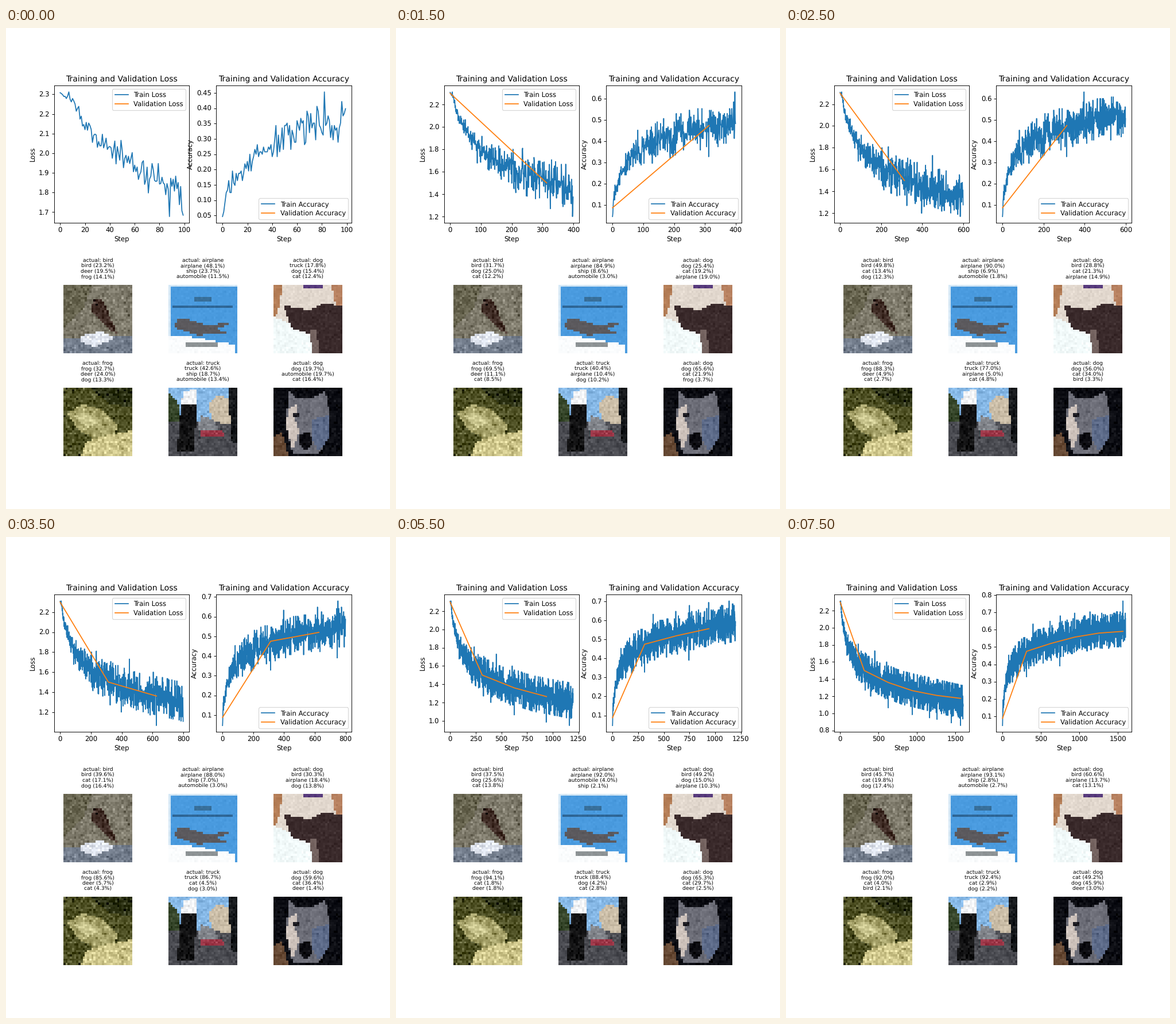
Animation of 669 by 837 pixels, one loop 8000 ms. Source, as a matplotlib script:

```python
import numpy as np
import matplotlib.pyplot as plt
from matplotlib.animation import FuncAnimation
from matplotlib.colors import to_rgb
from matplotlib.path import Path

W, H, DPI = 669, 837, 83.625
FRAMES, INTERVAL, STEPS = 16, 500, 100
BATCH, EPOCH = 128, 313

plt.rcParams["text.hinting"] = "none"

# ---------- training history: mean curve, noise width, outliers ----------
LOSS_MEAN = [(0, 2.305), (8, 2.285), (30, 2.08), (60, 1.93), (100, 1.80), (200, 1.62),
             (400, 1.45), (800, 1.30), (1600, 1.13)]
LOSS_NOISE = [(0, .003), (10, .025), (100, .06), (200, .098)]
LOSS_PEAKS = [(0, 2.308), (88, 1.677), (235, 1.81), (325, 1.27), (397, 1.2),
              (450, 1.73), (585, 1.17), (605, 1.6), (625, 1.065), (937, .985),
              (1163, .948), (1260, .93), (1445, .89), (1565, .858)]
ACC_MEAN = [(0, .047), (4, .14), (20, .21), (60, .34), (100, .37), (200, .43),
            (400, .49), (800, .55), (1200, .59), (1600, .603)]
ACC_NOISE = [(0, .008), (10, .03), (100, .045), (200, .05)]
ACC_PEAKS = [(0, .047), (82, .453), (312, .328), (397, .633), (617, .648),
             (745, .39), (750, .68), (937, .695), (1137, .703), (1565, .766)]
VAL_LOSS = np.array([2.3, 1.5, 1.36, 1.265, 1.21, 1.175])
VAL_ACC = np.array([.088, .475, .52, .557, .58, .59])


def curve(step, points):
    return np.interp(step, *zip(*points))


def noisy(step, mean, width, peaks, z):
    data = curve(step, mean) + curve(step, width) * np.clip(z, -2, 2)
    for at, value in peaks:
        data[at] = value
    return data


rng = np.random.default_rng(7)
step = np.arange(FRAMES * STEPS)
val_step = np.arange(len(VAL_LOSS)) * EPOCH
z, z2 = rng.normal(size=(2, step.size))
loss = noisy(step, LOSS_MEAN, LOSS_NOISE, LOSS_PEAKS, z)
acc = noisy(step, ACC_MEAN, ACC_NOISE, ACC_PEAKS, .75 * z2 - .65 * z)
acc = np.round(acc * BATCH) / BATCH

# ---------- predictions, known at a few frames and blended between ----------
KEYS = [0, 3, 5, 7, 9, 11, 15]
CAPTIONS = {
    "bird": """bird 23.2 deer 19.5 frog 14.1 | bird 31.7 dog 25.0 cat 12.2
        | bird 49.8 cat 13.4 dog 12.3 | bird 39.6 cat 17.1 dog 16.4
        | bird 33.5 cat 22.7 dog 16.4 | bird 37.5 dog 25.6 cat 13.8
        | bird 45.7 cat 19.8 dog 17.4""",
    "airplane": """airplane 48.1 ship 23.7 automobile 11.5
        | airplane 84.9 ship 8.6 automobile 3.0 | airplane 90.0 ship 6.9 automobile 1.8
        | airplane 88.0 ship 7.0 automobile 3.0 | airplane 89.8 ship 5.6 automobile 3.2
        | airplane 92.0 automobile 4.0 ship 2.1 | airplane 93.1 ship 2.8 automobile 2.7""",
    "dog": """truck 17.8 dog 15.4 cat 12.4 | dog 25.4 cat 19.2 airplane 19.0
        | bird 28.8 cat 21.3 airplane 14.9 | bird 30.3 airplane 18.4 dog 13.8
        | bird 41.2 cat 16.4 airplane 15.4 | bird 49.2 dog 15.0 airplane 10.3
        | bird 60.6 airplane 13.7 cat 13.1""",
    "frog": """frog 32.7 deer 24.0 dog 13.3 | frog 69.5 deer 11.1 cat 8.5
        | frog 88.3 deer 4.9 cat 2.7 | frog 85.6 deer 5.7 cat 4.3
        | frog 88.9 deer 4.9 cat 4.6 | frog 94.1 cat 1.8 deer 1.8
        | frog 92.0 cat 4.0 bird 2.1""",
    "truck": """truck 42.6 ship 18.7 automobile 13.4 | truck 40.4 airplane 10.4 dog 10.2
        | truck 77.0 airplane 5.0 cat 4.8 | truck 86.7 cat 4.5 dog 3.0
        | truck 81.8 cat 8.2 dog 4.8 | truck 88.4 dog 4.2 cat 2.8
        | truck 92.4 cat 2.9 dog 2.2""",
    "dog ": """dog 19.7 automobile 19.7 cat 16.4 | dog 65.6 cat 21.9 frog 3.7
        | dog 56.0 cat 34.0 bird 3.3 | dog 59.6 cat 36.4 deer 1.4
        | cat 60.4 dog 34.9 deer 2.4 | dog 65.3 cat 29.7 deer 2.5
        | cat 49.2 dog 45.9 deer 3.0""",
}


def parse(text):
    words = text.split()
    return {name: float(v) for name, v in zip(words[::2], words[1::2])}


def top_three(rows, k):
    i = max(j for j, key in enumerate(KEYS) if key <= k)
    j = min(i + 1, len(KEYS) - 1)
    u = (k - KEYS[i]) / (KEYS[j] - KEYS[i]) if j > i else 0
    a, b = rows[i], rows[j]
    low_a, low_b = .7 * min(a.values()), .7 * min(b.values())
    mix = {n: (1 - u) * a.get(n, low_a) + u * b.get(n, low_b) for n in {**a, **b}}
    return sorted(mix.items(), key=lambda item: -item[1])[:3]


# ---------- thumbnails: background, grain and flat shapes on a 32 x 32 grid ----------
THUMBS = [
    ("#7f7b6c", .06, [  # bird on a rock
        ("#67644f", "0,0 13,0 9,12 0,20"),
        ("#76808f", "0,25 32,24 32,32 0,32"),
        ("#dfe4ee", "8,24 18,22 24,25 15,29 8,27"),
        ("#3f2c25", "14,7 18,7 20,11 25,23 21,21 13,12"),
    ]),
    ("#4a9bdf", .01, [  # airplane on a poster
        ("#d5e8f6", "0,0 32,0 32,1 1,1 1,32 0,32"),
        ("#39709b", "12,6 20,6 20,8 12,8"),
        ("#2f6797", "2,10 30,10 30,11 2,11"),
        ("#fbfdfe", "0,24 8,24 31,28 31,32 0,32"),
        ("#8e9496", "8,27 23,27 23,29 8,29"),
        ("#5c5a5e", "4,16 9,16 17,19 29,18 22,21 29,23 18,23 14,24 3,20"),
    ]),
    ("#e2d8ce", .02, [  # dark animal on a blanket
        ("#b67f58", "0,0 4,0 3,10 0,17"),
        ("#573a7c", "14,0 23,0 23,2 14,2"),
        ("#b98362", "27,0 32,0 32,11 29,10"),
        ("#f2fafa", "0,15 7,18 17,20 19,32 0,32"),
        ("#3b2b2c", "5,10 17,12 23,9 32,10 32,32 21,32 17,23 8,20"),
        ("#73625f", "17,21 20,21 21,32 18,32"),
    ]),
    ("#4c4e22", .08, [  # frog among flowers
        ("#2b3012", "12,0 32,0 32,9 22,8"),
        ("#a5a169", "2,12 9,8 17,10 25,17 24,22 14,24 6,19"),
        ("#c5c18a", "5,13 12,12 16,17 10,19"),
        ("#cfc78c", "11,25 18,23 32,20 32,32 8,32"),
    ]),
    ("#86b8e6", .04, [  # tipper truck
        ("#37472b", "0,3 3,5 5,9 5,17 0,17"),
        ("#4b4c52", "0,16 32,16 32,32 0,32"),
        ("#cabda7", "19,7 23,4 28,5 29,17 20,16"),
        ("#14171a", "28,0 32,0 32,26 29,25"),
        ("#83868c", "15,13 22,16 23,20 14,20"),
        ("#9b3546", "15,20 25,20 26,23 15,23"),
        ("#131314", "6,8 13,8 12,30 4,30"),
        ("#f3f5f8", "7,2 13,1 13,8 6,8"),
    ]),
    ("#0c0d13", .03, [  # husky
        ("#674a35", "0,23 4,21 7,32 0,32"),
        ("#6c6d77", "7,2 11,5 18,5 24,2 26,12 26,23 21,31 9,31 6,18"),
        ("#cfc4bd", "7,10 11,8 10,15 12,20 9,30 6,18"),
        ("#5c6a88", "18,15 26,13 26,23 21,30 18,24"),
        ("#1a191f", "9,12 12,12 12,14 9,14"),
        ("#0b0b10", "12,22 17,21 18,26 15,29 12,27"),
    ]),
]


def thumbnail(base, grain, shapes, seed):
    y, x = np.mgrid[:32, :32] + .5
    cells = np.column_stack([x.ravel(), y.ravel()])
    image = np.tile(to_rgb(base), (len(cells), 1))
    for colour, outline in shapes:
        points = [tuple(map(float, p.split(","))) for p in outline.split()]
        image[Path(points).contains_points(cells)] = to_rgb(colour)
    image += grain * np.random.default_rng(seed).normal(size=(len(cells), 1))
    return np.clip(image, 0, 1).reshape(32, 32, 3)


# ---------- layout ----------
fig = plt.figure(figsize=(W / DPI, H / DPI), dpi=DPI, facecolor="white")


def add_axes(x, y, w, h):
    return fig.add_axes([x / W, 1 - (y + h) / H, w / W, h / H])


def add_chart(x, name, legend_at):
    ax = add_axes(x, 100.4, 235.7, 238.5)
    ax.set(title=f"Training and Validation {name}", ylabel=name)
    ax.set_xlabel("Step", labelpad=3)
    train, = ax.plot([], [], label=f"Train {name}")
    val, = ax.plot([], [], label=f"Validation {name}")
    ax.legend(loc=legend_at, labelspacing=.35)
    return ax, train, val


charts = [(*add_chart(83.6, "Loss", "upper right"), loss, VAL_LOSS),
          (*add_chart(366.5, "Accuracy", "lower right"), acc, VAL_ACC)]

SIDE, LINE = 119.3, 9.75
captions = []
for i, (thumb, (actual, text)) in enumerate(zip(THUMBS, CAPTIONS.items())):
    cx, top = 159.9 + 183 * (i % 3), 446.6 + 179 * (i // 3)
    ax = add_axes(cx - SIDE / 2, top, SIDE, SIDE)
    ax.imshow(thumbnail(*thumb, i), interpolation="nearest", aspect="auto")
    ax.axis("off")
    lines = [fig.text(cx / W, 1 - (top - 10.3 - LINE * (3 - row)) / H, "",
                      fontsize=8, ha="center", va="baseline") for row in range(4)]
    lines[0].set_text(f"actual: {actual.strip()}")
    captions.append((lines[1:], [parse(part) for part in text.split("|")]))


def update(k):
    n = (k + 1) * STEPS
    seen = val_step < n
    for ax, train, val, data, val_data in charts:
        train.set_data(step[:n], data[:n])
        val.set_data(val_step[seen], val_data[seen])
        ax.relim()
        ax.autoscale_view()
    for lines, rows in captions:
        for line, (name, score) in zip(lines, top_three(rows, k)):
            line.set_text(f"{name} ({score:.1f}%)")
    return []


anim = FuncAnimation(fig, update, frames=FRAMES, interval=INTERVAL,
                     init_func=lambda: update(0), repeat=True, repeat_delay=0)
plt.show()
```
